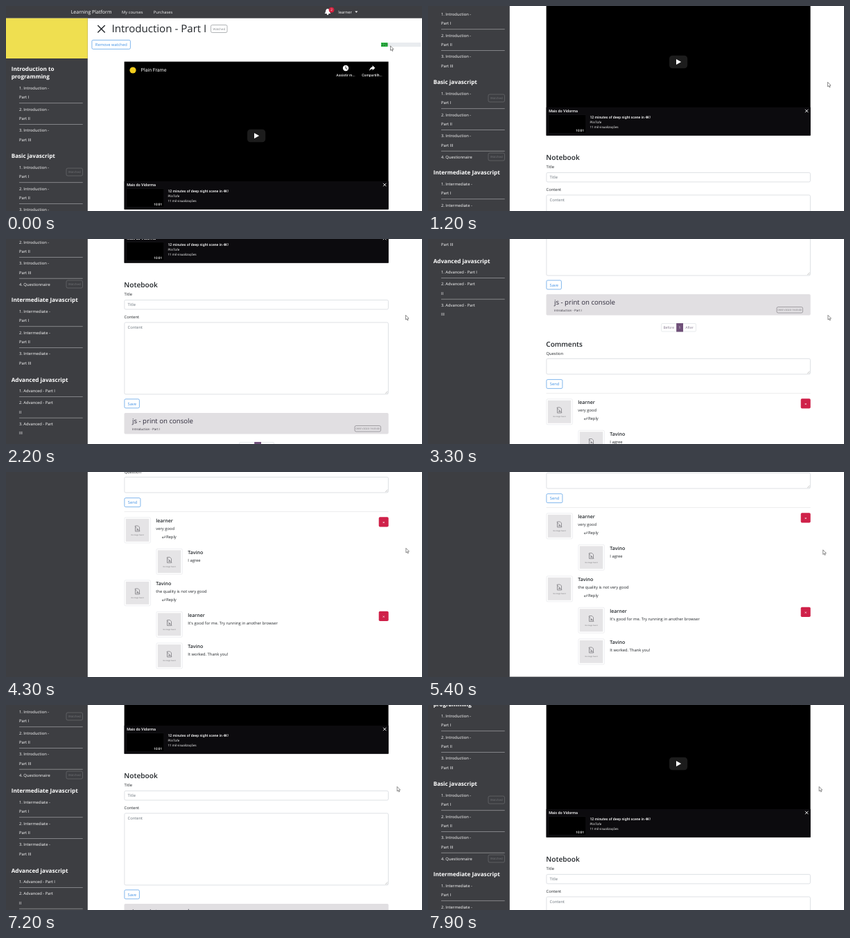
An HTML page with a canvas for the animation above (8 s loop, 600 by 297 pixels).

```html
<!DOCTYPE html>
<html lang="en">
<head>
<meta charset="utf-8">
<title>Learning Platform</title>
<style>
html, body { margin: 0; width: 100%; height: 100%; overflow: hidden; background: #fff; }
canvas { display: block; width: 600px; height: 297px; }
</style>
</head>
<body>
<canvas id="stage" width="600" height="297"></canvas>
<script>
const ctx = document.getElementById('stage').getContext('2d');
const W = 600, H = 297, LOOP = 8000, STEP = 100;
const DARK = '#3d3e42', INK = '#212529', GREY = '#6c757d', BLUE = '#3f90e4', LINE = '#d0d5da';
const SANS = '"Open Sans", "Noto Sans", sans-serif';
const ROBOTO = 'Roboto, Arial, sans-serif';
const BODY = 5.8;
const MEDIUM = { weight: 500 }, SEMI = { weight: 600 }, BOLD = { weight: 700 };

// [time, scroll]
const scrollKeys = [
  [0, 0], [600, 0], [1200, 107], [2200, 259.5], [2400, 291], [2500, 291],
  [2700, 332], [2800, 332], [3300, 432], [4100, 588], [4200, 588],
  [4900, 655], [5100, 655], [5400, 604], [6000, 476], [6500, 373],
  [6600, 373], [7500, 150], [7700, 150], [7900, 103], [8000, 103]
];
// [time, x, y] of the pointer tip
const pointerKeys = [
  [0, 554, 57.5], [600, 554, 57.5], [1000, 576, 110], [2900, 576, 110],
  [3300, 576.4, 110], [4900, 576.4, 110], [5400, 569.2, 112.5], [6000, 563.6, 118], [8000, 563.6, 118]
];

function at(keys, time, col = 1) {
  const i = Math.max(1, keys.findIndex(k => k[0] >= time));
  const a = keys[i - 1], b = keys[i];
  return a[col] + (b[col] - a[col]) * (time - a[0]) / (b[0] - a[0]);
}

function text(str, x, y, size, color = INK, opt = {}) {
  ctx.font = `${opt.weight || 400} ${size}px ${opt.font || SANS}`;
  ctx.textAlign = opt.align || 'left';
  ctx.fillStyle = color;
  ctx.fillText(str, x, y);
}

function rect(x, y, w, h, color) {
  ctx.fillStyle = color;
  ctx.fillRect(x, y, w, h);
}

function box(x, y, w, h, r, fill, stroke, lw = 0.8) {
  ctx.beginPath();
  ctx.roundRect(x, y, w, h, r);
  if (fill) { ctx.fillStyle = fill; ctx.fill(); }
  if (stroke) { ctx.strokeStyle = stroke; ctx.lineWidth = lw; ctx.stroke(); }
}

function path(points, color, lw) {
  ctx.beginPath();
  points.forEach(([x, y], i) => i ? ctx.lineTo(x, y) : ctx.moveTo(x, y));
  if (lw) { ctx.strokeStyle = color; ctx.lineWidth = lw; ctx.stroke(); }
  else { ctx.fillStyle = color; ctx.fill(); }
}

function disc(x, y, r, color) {
  ctx.beginPath();
  ctx.arc(x, y, r, 0, 7);
  ctx.fillStyle = color;
  ctx.fill();
}

function cross(x, y, r, color, lw) {
  path([[x - r, y - r], [x + r, y + r]], color, lw);
  path([[x + r, y - r], [x - r, y + r]], color, lw);
}

function badge(x, y, w, h, label, size, color) {
  box(x + .5, y + .5, w - 1, h - 1, 2, null, color, 0.6);
  text(label, x + w / 2, y + h / 2 + size * .36, size, color, { align: 'center' });
}

function button(x, y, w, label) {
  box(x + .4, y + .4, w - 1, 13, 1.8, '#fff', BLUE, 0.65);
  text(label, x + w / 2, y + 9.2, 5.75, BLUE, { align: 'center' });
}

function field(y, h, hint, grip) {
  box(170.9, y + .4, 380.5, h - 1, 1.8, '#fff', LINE, 0.7);
  if (hint) text(hint, 175.5, y + 9, BODY, GREY);
  if (grip) {
    path([[547, y + h - 1.5], [550.5, y + h - 5]], '#999', 0.5);
    path([[549, y + h - 1.5], [550.5, y + h - 3]], '#999', 0.5);
  }
}

function navbar() {
  rect(0, 0, W, 17.7, DARK);
  text('Learning Platform', 93.7, 11.3, 7.02, '#fff', MEDIUM);
  text('My courses', 167, 10.8, BODY, '#f0f0f0');
  text('Purchases', 212.7, 10.8, BODY, '#f0f0f0');
  ctx.beginPath();
  ctx.moveTo(459.5, 11);
  ctx.bezierCurveTo(462, 9, 460, 4.5, 464, 4);
  ctx.bezierCurveTo(468, 4.5, 466, 9, 468.5, 11);
  ctx.fillStyle = '#fff';
  ctx.fill();
  disc(464, 11.7, 1.3, '#fff');
  disc(469.5, 5.6, 3.9, '#d3213f');
  text('2', 469.5, 7.3, 4.6, '#fff', { align: 'center' });
  text('learner', 479.3, 10.8, BODY, '#fff');
  path([[503.3, 7.6], [507.3, 7.6], [505.3, 9.8]], '#fff');
}

function lesson(part, y, first) {
  const lines = part.split('|');
  if (!first) rect(19, y - 9.3, 91.7, 0.7, '#a3a3a6');
  lines.forEach((s, i) => text(s, 19, y + 2 + i * 13.3, BODY, '#fff', MEDIUM));
  return y + 4.1 + lines.length * 13.3;
}

function section(titles, titleY, y, items) {
  titles.forEach((s, i) => text(s, 7.7, titleY + i * 10.7, 8.15, '#fff', BOLD));
  items.forEach((s, i) => { y = lesson(s, y, !i); });
}

function parts(name) {
  return ['I', 'II', 'III'].map((n, i) => `${i + 1}. ${name} -|Part ${n}`);
}

function sidebar() {
  rect(0, 17.7, 117.8, 1000, DARK);
  rect(0, 17.7, 117.8, 58.3, '#efdf50');
  section(['Introduction to', 'programming'], 94.4, 119, parts('Introduction'));
  section(['Basic javascript'], 220, 234, [...parts('Introduction'), '4. Questionnaire']);
  section(['Intermediate Javascript'], 351, 365, parts('Intermediate'));
  section(['Advanced javascript'], 466.5, 480,
    ['1. Advanced - Part I', '2. Advanced - Part|II', '3. Advanced - Part|III']);
  badge(86.5, 234.5, 24.5, 12, 'Watched', 4.4, '#737478');
  badge(86.5, 319.5, 24.5, 12, 'Watched', 4.4, '#737478');
}

function header() {
  cross(137.5, 33.2, 5.2, INK, 1.4);
  text('Introduction - Part I', 152.5, 38.2, 15.1, INK, MEDIUM);
  badge(295, 27, 24.5, 12, 'Watched', 4.3, '#7d8185');
  button(123.5, 49, 56.5, 'Remove watched');
  rect(541, 53, 57, 6, '#e9ecef');
  ctx.save();
  ctx.beginPath();
  ctx.rect(541, 53, 9.5, 6);
  ctx.clip();
  rect(541, 53, 10, 6, '#2fc348');
  text('22%', 541.2, 58.2, 5.6, '#1c3a22');
  ctx.restore();
}

function video() {
  const f = { font: ROBOTO }, m = { font: ROBOTO, weight: 500 };
  const mid = { font: ROBOTO, weight: 500, align: 'center' };
  rect(170.6, 80.6, 381, 214, '#000');
  disc(183, 93, 4.6, '#f2cd1c');
  text('Plain Frame', 194.5, 95.3, 7.03, '#eee', f);
  disc(490, 90, 4.2, '#fff');
  path([[490, 87.3], [490, 90.3], [492.2, 91.6]], '#000', 0.8);
  text('Assistir m...', 490, 101.6, 5.08, '#eee', mid);
  ctx.beginPath();
  ctx.moveTo(524, 94);
  ctx.quadraticCurveTo(525, 88.7, 528.6, 88.3);
  ctx.lineTo(528.6, 86);
  ctx.lineTo(532.3, 89.7);
  ctx.lineTo(528.6, 93.2);
  ctx.lineTo(528.6, 91);
  ctx.quadraticCurveTo(526, 91, 524, 94);
  ctx.fillStyle = '#fff';
  ctx.fill();
  text('Compartilh...', 528, 101.6, 5.08, '#eee', mid);
  box(348, 178.8, 26.2, 18.4, 4.5, '#1c1c1c');
  path([[358, 184], [365.2, 188], [358, 192]], '#fff');

  rect(170.6, 253.8, 381, 40.8, '#0c0b0e');
  text('Mais do Vidorma', 174.2, 261.2, 5.47, '#fff', m);
  cross(546.2, 259, 2.2, '#fff', 0.9);
  box(173.8, 264.5, 54, 27, 0, '#000', '#17161a', 0.6);
  text('10:01', 219.2, 288.6, 4.7, '#fff', mid);
  text('12 minutes of deep night scene in 4K!', 233.4, 269.5, 5.2, '#fff', m);
  text('PlinTofe', 233.4, 276.9, 4.6, '#eee', f);
  text('11 mil visualizações', 233.4, 283.6, 4.6, '#eee', f);
}

function notebook() {
  text('Notebook', 170.3, 330.3, 10.15, INK, SEMI);
  text('Title', 170.5, 342.2, BODY);
  field(348, 14.5, 'Title');
  text('Content', 170.5, 375.2, BODY);
  field(380.5, 105, 'Content', true);
  button(170.5, 491.5, 22.5, 'Save');
  box(170.5, 512, 381.2, 30.5, 1.8, '#e1dfe2');
  text('js - print on console', 182, 527.3, 9.65, '#2d2a3a');
  text('Introduction - Part I', 182, 537, 4.4, '#33303a');
  badge(502.5, 530, 38.5, 9.5, '08/01/2020 18:03:00', 3.6, '#77757a');

  box(336.5, 554.5, 50, 11.5, 1.5, '#fff', '#dee2e6', 0.7);
  rect(358.2, 554, 9.8, 12.5, '#6f5079');
  text('Before', 347.3, 562.2, 5, '#80738a', { align: 'center' });
  text('1', 363, 562.2, 5, '#fff', { align: 'center' });
  text('After', 377, 562.2, 5, '#80738a', { align: 'center' });
}

function avatar(x, y) {
  box(x + .4, y + .3, 37.5, 37, 1.8, '#fff', '#e2e5e8', 0.6);
  rect(x + 2.3, y + 2.3, 33.5, 33, '#e5e4e6');
  const cx = x + 19, cy = y + 16.5;
  path([[cx - 3, cy - 4], [cx + 1, cy - 4], [cx + 3, cy - 2], [cx + 3, cy + 4], [cx - 3, cy + 4], [cx - 3, cy - 4]], '#8b8a8e', 0.9);
  path([[cx - 1.8, cy + 2.6], [cx, cy], [cx + 1.8, cy + 2.6]], '#8b8a8e');
  path([[cx - 3.6, cy - 3.4], [cx + 3.8, cy + 4]], '#8b8a8e', 0.8);
  text('No image found', cx, y + 26.7, 2.4, '#69686c', { align: 'center' });
}

function comment(y, name, body, nested, own) {
  const x = nested ? 216.5 : 170.5;
  avatar(x, y);
  text(name, x + 45.8, y + 7.5, 7, INK, SEMI);
  text(body, x + 45.8, y + 18.8, BODY);
  if (!nested) {
    path([[229.3, y + 26.8], [229.3, y + 29.4], [225.2, y + 29.4]], INK, 0.6);
    path([[226.5, y + 28.2], [225.2, y + 29.4], [226.5, y + 30.6]], INK, 0.6);
    text('Reply', 231, y + 30.9, BODY);
  }
  if (own) {
    box(537.7, y - .2, 14, 14.3, 1.8, '#cf2149');
    cross(544.7, y + 7.6, 1, '#fff', 0.7);
  }
}

function comments() {
  text('Comments', 170.3, 588.2, 10, INK, SEMI);
  text('Question', 170.5, 600.2, BODY);
  field(605, 23.5, '', true);
  button(170.5, 635.2, 24, 'Send');
  rect(170.6, 655, 381, 1, '#ededee');
  [
    ['learner', 'very good', false, true],
    ['Tavino', 'I agree', true, false],
    ['Tavino', 'the quality is not very good', false, false],
    ['learner', "It's good for me. Try running in another browser", true, true],
    ['Tavino', 'It worked. Thank you!', true, false]
  ].forEach((c, i) => comment(663.5 + i * 45.5, ...c));
  rect(117.8, 900.6, 483, 100, DARK);
}

function pointer(x, y) {
  const shape = [[0, 0], [0, 6.6], [1.5, 5.3], [2.5, 7.6], [3.6, 7.1], [2.6, 4.9], [4.6, 4.8], [0, 0]]
    .map(([a, b]) => [x + .5 + a, y + .3 + b]);
  path(shape, '#fff');
  path(shape, '#444', 0.6);
}

function draw(time) {
  rect(0, 0, W, H, '#fff');
  ctx.save();
  ctx.translate(0, -Math.round(at(scrollKeys, time)));
  navbar();
  sidebar();
  header();
  video();
  notebook();
  comments();
  ctx.restore();
  pointer(at(pointerKeys, time), at(pointerKeys, time, 2));
}

ctx.textRendering = 'geometricPrecision';
const start = performance.now();
function tick() {
  const time = (performance.now() - start) % LOOP;
  draw(Math.floor(time / STEP) * STEP);
  requestAnimationFrame(tick);
}
tick();
</script>
</body>
</html>
```
